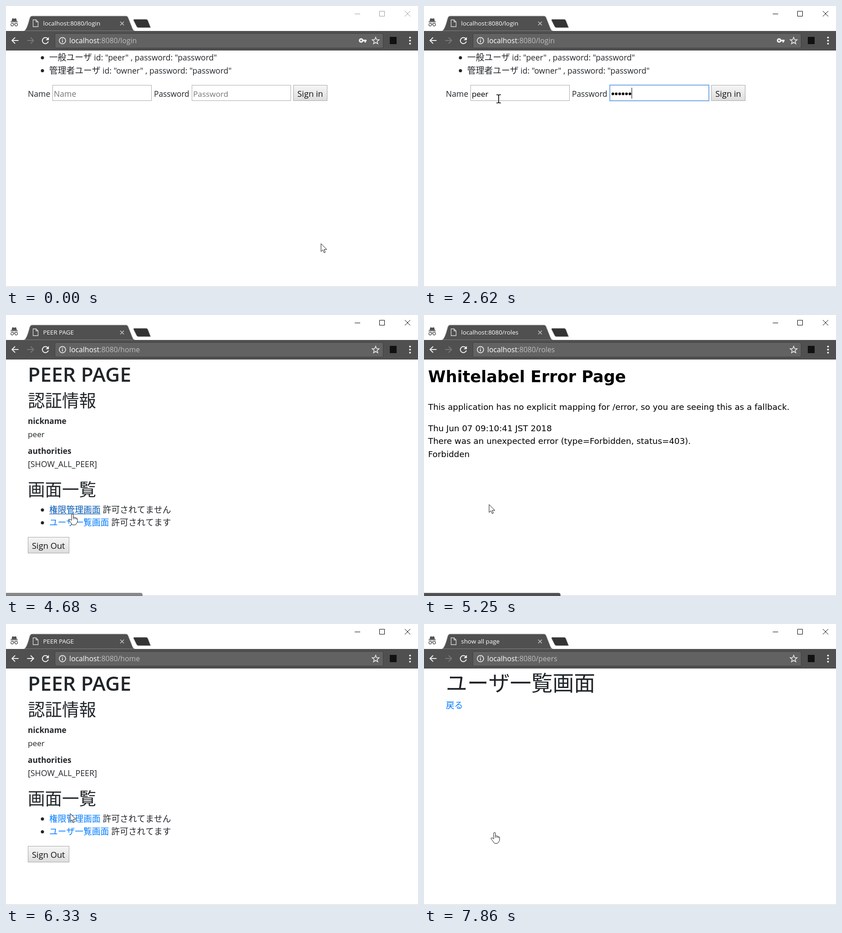
An HTML page with a canvas for the animation above (8000 ms loop, 905x619 px).

```html
<!DOCTYPE html>
<html lang="ja">
<head>
<meta charset="utf-8">
<title>Login demo</title>
<style>
html, body { margin: 0; width: 100%; height: 100%; overflow: hidden; background: #fff; }
canvas { display: block; }
</style>
</head>
<body>
<canvas id="stage" width="905" height="619"></canvas>
<script>
const ctx = document.getElementById('stage').getContext('2d');
const LOOP = 8000;
const LATIN = "'Open Sans', 'Noto Sans', sans-serif";
const KANJI = "'Noto Sans CJK JP', 'Noto Sans CJK', sans-serif";
const WIDE = "'DejaVu Sans', sans-serif";
const INK = '#212529', LINK = '#007bff', HOVER = '#0056b3', BAR = '#505050';
const LOGIN = 'peer';

// Bursts of screen updates: first, last, count
const bursts = [
  [100, 540, 5], [870, 870, 1], [1090, 1190, 2], [1420, 1420, 1], [1720, 1850, 2],
  [2170, 2280, 2], [2500, 2620, 2], [2840, 2840, 1], [3260, 3590, 4], [3810, 4020, 3],
  [4240, 4900, 7], [5250, 5340, 2], [5570, 6030, 5], [6330, 6330, 1], [6580, 7010, 5],
  [7320, 7430, 2], [7660, 7860, 3]
];
const ticks = [0];
for (const [a, b, n] of bursts)
  for (let i = 0; i < n; i++) ticks.push(Math.round(a + (b - a) * i / Math.max(1, n - 1)));

const pointer = [
  [0, 692, 523, 'arrow'], [50, 692, 523, 'arrow'], [430, 166, 207, 'beam'],
  [540, 163, 203, 'beam'], [870, 164, 204, 'beam'], [3700, 164, 204, 'beam'],
  [4020, 163, 206, 'beam'], [4130, 163, 206, 'arrow'], [4570, 147, 441, 'hand'],
  [4680, 146, 438, 'hand'], [4900, 144, 418, 'hand'], [5250, 143, 417, 'arrow'],
  [5460, 143, 417, 'arrow'], [6030, 141, 417, 'arrow'], [6480, 141, 417, 'arrow'],
  [6580, 142, 425, 'hand'], [7010, 155, 459, 'hand'], [LOOP, 155, 459, 'hand']
];
const bubble = [
  [0, 0], [3200, 0], [3480, 1], [3700, 1], [4020, 0], [4460, 0], [4570, 0.3], [4680, 0.68],
  [4790, 1], [5460, 1], [5790, 0], [6580, 0], [6900, 1], [7550, 1], [7860, 0], [LOOP, 0]
];
const dotTimes = [1720, 1850, 2170, 2280, 2500, 2620, 2840, 2840];

function track(keys, t) {
  let i = 0;
  while (i < keys.length - 2 && keys[i + 1][0] <= t) i++;
  const a = keys[i], b = keys[i + 1];
  const f = (t - a[0]) / (b[0] - a[0]);
  return a.map((v, k) => typeof v === 'number' ? v + (b[k] - v) * f : v);
}

function text(s, x, y, size, color = INK, weight = 400, family = LATIN) {
  ctx.font = `${weight} ${size}px ${family}`;
  ctx.fillStyle = color;
  ctx.fillText(s, x, y);
  return x + ctx.measureText(s).width;
}
const kanji = (s, x, y, size = 18.75, color = INK, weight = 300) =>
  text(s, x, y, size, color, weight, KANJI);

function rect(x, y, w, h, color) {
  ctx.fillStyle = color;
  ctx.fillRect(x, y, w, h);
}
function frame(x, y, w, h, color, fill = '#fff') {
  rect(x, y, w, h, color);
  rect(x + 1, y + 1, w - 2, h - 2, fill);
}
function dot(x, y, r, color) {
  ctx.beginPath();
  ctx.arc(x, y, r, 0, 7);
  ctx.fillStyle = color;
  ctx.fill();
}
function path(d, x, y, stroke, width = 1, fill) {
  const p = new Path2D(d);
  ctx.save();
  ctx.translate(x, y);
  if (fill) { ctx.fillStyle = fill; ctx.fill(p); }
  if (stroke) { ctx.strokeStyle = stroke; ctx.lineWidth = width; ctx.stroke(p); }
  ctx.restore();
}

function drawChrome(page, active, canForward) {
  // title bar
  path('M8 -1H-8M-5 -3L-3.5 -8L0 -7.2L3.5 -8L5 -3Z', 18, 36, '#505050', 1.6, '#505050');
  path('M-1.4 5A3 3 0 1 1 -7.4 5A3 3 0 1 1 -1.4 5M7.4 5A3 3 0 1 1 1.4 5A3 3 0 1 1 7.4 5M-2 4Q0 3 2 4', 18, 36, '#505050', 1.3);
  path('M39.5 55C45 53 49 38 52 27Q53.5 22 57 22H264Q267 22 268.5 26L278 50Q279.5 54 283 55Z', 0, 0, '#b8b8b8', 1, BAR);
  path('M281 29.5H308Q310.5 29.5 311.5 32L317.5 47.5H291Q288 47.5 287 45L280 31Z', 0, 0, '#8a8a8a', 1, '#343434');
  const btn = active ? '#000' : '#999';
  rect(766, 17, 12, 1, btn);
  path('M.5 .5H11.5V11.5H.5Z', 820, 11, btn);
  path('M0 0L12 12M12 0L0 12', 876, 11, btn);
  path('M.5 .5H7L11.5 5V15.5H.5ZM7 .5V5H11.5', 59, 30, '#ddd', 1.3);
  text(page.title, 81.5, 43, 13.4, '#fff');
  path('M-4 -4L4 4M4 -4L-4 4', 255, 38.5, '#ccc', 1.4);

  // toolbar
  rect(0, 55, 905, 43, BAR);
  rect(0, 97, 905, 1, '#3f3f3f');
  const arrow = 'M7.5 0H-6.5M0 -6.8L-6.8 0L0 6.8';
  path(arrow, 20, 76, '#f0f0f0', 2);
  ctx.save();
  ctx.translate(54, 76);
  ctx.scale(-1, 1);
  path(arrow, 0, 0, canForward ? '#f0f0f0' : '#777', 2);
  ctx.restore();
  path('M5.2 -4.4A6.7 6.7 0 1 0 6.5 1.8', 86.5, 76.3, '#f0f0f0', 2);
  path('M7.7 -8V-1H.7Z', 86.5, 76.3, null, 1, '#f0f0f0');
  path('M110 60.5H826Q828.5 60.5 828.5 63V90Q828.5 92.5 826 92.5H110Q107.5 92.5 107.5 90V63Q107.5 60.5 110 60.5Z', 0, 0, '#3e3e3e', 1, '#626262');
  path('M7 0A7 7 0 1 1 -7 0A7 7 0 1 1 7 0M0 -1V4M0 -4V-2.2', 124, 76.3, '#eee', 1.7);
  const x = text('localhost', 139, 82, 15.8, '#fff');
  text(':8080' + page.route, x, 82, 15.8, '#bdbdbd');
  if (page.key) {
    dot(780, 76, 5, '#eee');
    rect(783, 74.3, 9, 3.5, '#eee');
    rect(787.5, 76, 3, 4.5, '#eee');
    dot(780, 76, 1.8, '#626262');
  }
  let star = '';
  for (let i = 0; i < 10; i++) {
    const r = i % 2 ? 3.4 : 8, a = i * Math.PI / 5 - Math.PI / 2;
    star += (i ? 'L' : 'M') + r * Math.cos(a) + ' ' + r * Math.sin(a);
  }
  path(star + 'Z', 812, 76.8, '#eee', 1.5);
  rect(843, 68, 15, 16, '#111');
  for (const y of [69.5, 76.2, 83]) dot(887.5, y, 2, '#f0f0f0');
}

function button(label, x, y, w, h) {
  const g = ctx.createLinearGradient(0, y, 0, y + h);
  g.addColorStop(0, '#f6f6f6');
  g.addColorStop(1, '#dddddd');
  frame(x, y, w, h, '#a5a5a5', g);
  text(label, x + 9, y + 26, 18.3, '#111');
}
function field(x, focused) {
  if (focused) frame(x - 1, 173, 220, 37, '#a8c8f0');
  frame(x, 174, 218, 35, focused ? '#4a8ae0' : '#a9a9a9');
}
const caret = x => rect(Math.round(x), 180, 1, 24, '#000');

function drawLogin(t) {
  const lines = [['一般ユーザ', LOGIN, 120], ['管理者ユーザ', 'owner', 148.5]];
  for (const [role, id, y] of lines) {
    dot(80, y - 6, 3.5, INK);
    const x = kanji(role, 95, y);
    text(` id: "${id}" , password: "password"`, x, y, 17.5);
  }
  const onName = t >= 430 && t < 1420, onPass = t >= 1420;
  text('Name', 48, 200, 17.6);
  field(102, onName);
  text('Password', 325, 200, 17.3);
  field(408, onPass);
  button('Sign in', 631, 174, 75, 35);

  const typed = LOGIN.slice(0, t < 870 ? 0 : t < 1090 ? 1 : t < 1190 ? 3 : 4);
  let end = 104;
  if (typed) end = text(typed, 105, 200, 17, '#000');
  else text('Name', 105, 200, 17.6, '#757575');
  if (onName) caret(end);

  const dots = dotTimes.filter(d => t >= d).length;
  if (!dots) text('Password', 411, 200, 17.2, '#757575');
  for (let i = 0; i < dots; i++) dot(414.8 + 7.5 * i, 193.5, 2.9, '#000');
  if (onPass) caret(411 + 7.5 * dots);

  if (t >= 540 && t < 1420) {
    rect(102, 208, 220, 31, '#000');
    rect(104, 210, 217, 28, '#fff');
    text(LOGIN, 113, 229.5, 13, '#000', 600);
  }
}

function drawHome(t) {
  text('PEER PAGE', 48, 147, 44.3, INK, 600);
  kanji('認証情報', 48, 202, 37.5);
  text('nickname', 48, 240, 17.2, INK, 700);
  text(LOGIN, 48, 269, 17.2);
  text('authorities', 48, 306, 17.2, INK, 700);
  text('[SHOW_ALL_PEER]', 48, 334.5, 17.8);
  kanji('画面一覧', 48, 398, 37.5);
  const over = t >= 4570 && t < 5250 || t === 6580 ? 0 : t > 6580 ? 1 : -1;
  const rows = [['権限管理画面', '許可されてません'], ['ユーザ一覧画面', '許可されてます']];
  rows.forEach(([name, note], i) => {
    const y = 435.5 + 28.3 * i;
    dot(80, y - 6, 3.5, INK);
    const color = i === over ? HOVER : LINK;
    const x = kanji(name, 95, y, 18.75, color);
    if (i === over) rect(95, Math.round(y + 2), x - 95, 1, color);
    kanji(note, x + 5, y);
  });
  button('Sign Out', 48, 489, 91, 36);
}

function drawError() {
  const say = (s, y) => text(s, 9, y, 18.28, '#000', 400, WIDE);
  text('Whitelabel Error Page', 9, 148, 35.1, '#000', 700, WIDE);
  say('This application has no explicit mapping for /error, so you are seeing this as a fallback.', 209);
  say('Thu Jun 07 09:10:41 JST 2018', 256);
  say('There was an unexpected error (type=Forbidden, status=403).', 284.3);
  say('Forbidden', 312.6);
}

function drawList() {
  kanji('ユーザ一覧画面', 48, 147, 46.9, INK, 400);
  kanji('戻る', 48, 186, 18.75, LINK);
}

const login = { title: 'localhost:8080/login', route: '/login', key: true, draw: drawLogin };
const home = { title: 'PEER PAGE', route: '/home', draw: drawHome };
const denied = { title: 'localhost:8080/roles', route: '/roles', draw: drawError };
const list = { title: 'show all page', route: '/peers', draw: drawList };
const visits = [[0, login], [3370, home], [5250, denied], [6330, home], [7320, list]];

const cursors = {
  arrow(x, y) {
    path('M.5 .5V18L4.5 14.2L7.2 20.5L9.9 19.4L7.3 13.3H13Z', x - 0.5, y, '#111', 1, '#fff');
  },
  beam(x, y) {
    const d = 'M-5 -9H-1.5L0 -8L1.5 -9H5M0 -8V8M-5 9H-1.5L0 8L1.5 9H5';
    path(d, x, y + 0.5, '#fff', 3.5);
    path(d, x, y + 0.5, '#000', 1.7);
  },
  hand(x, y) {
    path('M-2 2Q-2 .5 0 .5Q2 .5 2 2V8Q4 6.5 5.5 8.5Q8 7.5 8.7 9.7Q11 9.5 11 12V16Q11 19 9 21Q8 24.5 4 24.5H2Q-1 24.5 -2 22Q-4 18 -7.5 14.7Q-8.5 12.5 -6.5 12Q-4 12 -2 14.5Z',
      x, y, '#111', 1, '#fff');
    path('M2 8V12M5.5 8.5V12M8.7 9.7V12.5', x, y, '#111');
  }
};

function draw(now) {
  const clock = now % LOOP;
  const t = ticks.findLast(k => k <= clock);
  const page = visits.findLast(v => v[0] <= t)[1];
  rect(0, 0, 905, 619, '#fff');
  drawChrome(page, t >= 430, page === home && t >= 6330);
  page.draw(t);
  rect(0, 618, 905, 1, '#cfcfcf');

  ctx.globalAlpha = track(bubble, t)[1];
  path('M0 612.5H296Q299.5 612.5 299.5 616V625H0Z', 0, 0, '#777', 1, BAR);
  ctx.globalAlpha = 1;

  const [, x, y, kind] = track(pointer, t);
  cursors[kind](Math.round(x), Math.round(y));
}

const start = performance.now();
function loop() {
  draw(Math.max(0, performance.now() - start));
  requestAnimationFrame(loop);
}
loop();
</script>
</body>
</html>
```
